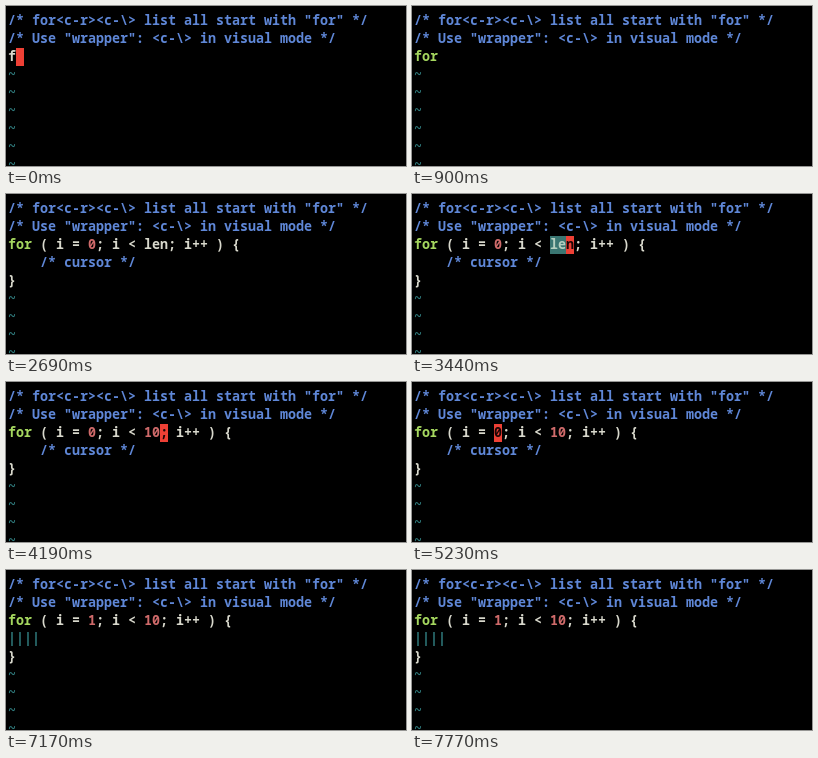
Animation, 400 px wide and 160 px high, one loop 8 s. Source, as an HTML page:

```html
<!DOCTYPE html>
<html lang="en">
<head>
<meta charset="utf-8">
<title>Editor snippet demo</title>
<style>
  html, body { margin: 0; width: 100%; height: 100%; overflow: hidden; background: #000; }
  #screen {
    box-sizing: border-box; width: 100%; height: 100%; margin: 0; padding: 6px 0 0 2px;
    overflow: hidden; contain: strict;
    font: 600 13.333px/18px "Noto Sans Mono", "DejaVu Sans Mono", monospace;
    font-variant-ligatures: none;
    color: #d8d8cc;
  }
  .row { height: 18px; white-space: pre; }
  .row span { display: inline-block; height: 18px; line-height: 16px; vertical-align: top; }
  .comment { color: #5f87d7; }
  .keyword { color: #a5d75f; }
  .number { color: #cf6a6a; }
  .faint { color: #2f7a7c; }
  .row .selected { background: #3a7672; color: #b4cfc0; }
  .row .cursor { background: #ee4035; color: #1c0505; }
</style>
</head>
<body>
<pre id="screen"></pre>
<script>
const LOOP = 8000, ROWS = 9;
const HEADER = [
  '/* for<c-r><c-\\> list all start with "for" */',
  '/* Use "wrapper": <c-\\> in visual mode */'
];
const TOKENS = /(\/\*.*\*\/)|(\bfor\b)|(\b\d+\b)|(^~|\|+)/g;
const KINDS = ['comment', 'keyword', 'number', 'faint'];

const loop = (start, end, body = '    /* cursor */') =>
  [`for ( i = ${start}; i < ${end}; i++ ) {`, body, '}'];

// Each step: time in ms, code lines, cursor column, selection start, cursor row
const steps = [
  { at: 0, code: ['f'], col: 1 },
  { at: 150, code: ['fo'], col: 2 },
  { at: 300, code: ['for'], col: 3 },
  { at: 900, code: ['for'] },
  { at: 1790, code: loop('0', 'len'), col: 6 },
  { at: 2690, code: loop('0', 'len') },
  { at: 2840, code: loop('0', 'len'), col: 10 },
  { at: 3440, code: loop('0', 'len'), col: 19, from: 17 },
  { at: 4040, code: loop('0', '1'), col: 18 },
  { at: 4190, code: loop('0', '10'), col: 19 },
  { at: 5230, code: loop('0', '10'), col: 10 },
  { at: 6130, code: loop('1', '10'), col: 11 },
  { at: 6730, code: loop('1', '10'), col: 18, from: 17 },
  { at: 7170, code: loop('1', '10', '||||') },
  { at: 7320, code: loop('1', '10', '||||'), col: 4, row: 3 },
  { at: 7770, code: loop('1', '10', '||||') }
];

const screen = document.getElementById('screen');

function classify(line) {
  const kinds = Array(line.length).fill('');
  for (const m of line.matchAll(TOKENS)) {
    const kind = KINDS[m.slice(1).findIndex(Boolean)];
    kinds.fill(kind, m.index, m.index + m[0].length);
  }
  return kinds;
}

function drawRow(line, col = -1, from = col) {
  const row = document.createElement('div');
  row.className = 'row';
  const kinds = classify(line);
  [...line.padEnd(col + 1)].forEach((ch, i) => {
    const cell = document.createElement('span');
    cell.textContent = ch;
    cell.className = i === col ? 'cursor'
      : i >= from && i < col ? 'selected'
      : kinds[i] || '';
    row.append(cell);
  });
  return row;
}

function draw({ code, col, from, row = 2 }) {
  const lines = [...HEADER, ...code];
  while (lines.length < ROWS) lines.push('~');
  screen.replaceChildren(...lines.map((line, i) =>
    i === row ? drawRow(line, col, from) : drawRow(line)));
}

let shown;
const begin = performance.now();
function tick() {
  const t = (performance.now() - begin) % LOOP;
  const step = steps.findLast(s => s.at <= t);
  if (step !== shown) draw(shown = step);
  requestAnimationFrame(tick);
}
tick();
</script>
</body>
</html>
```
